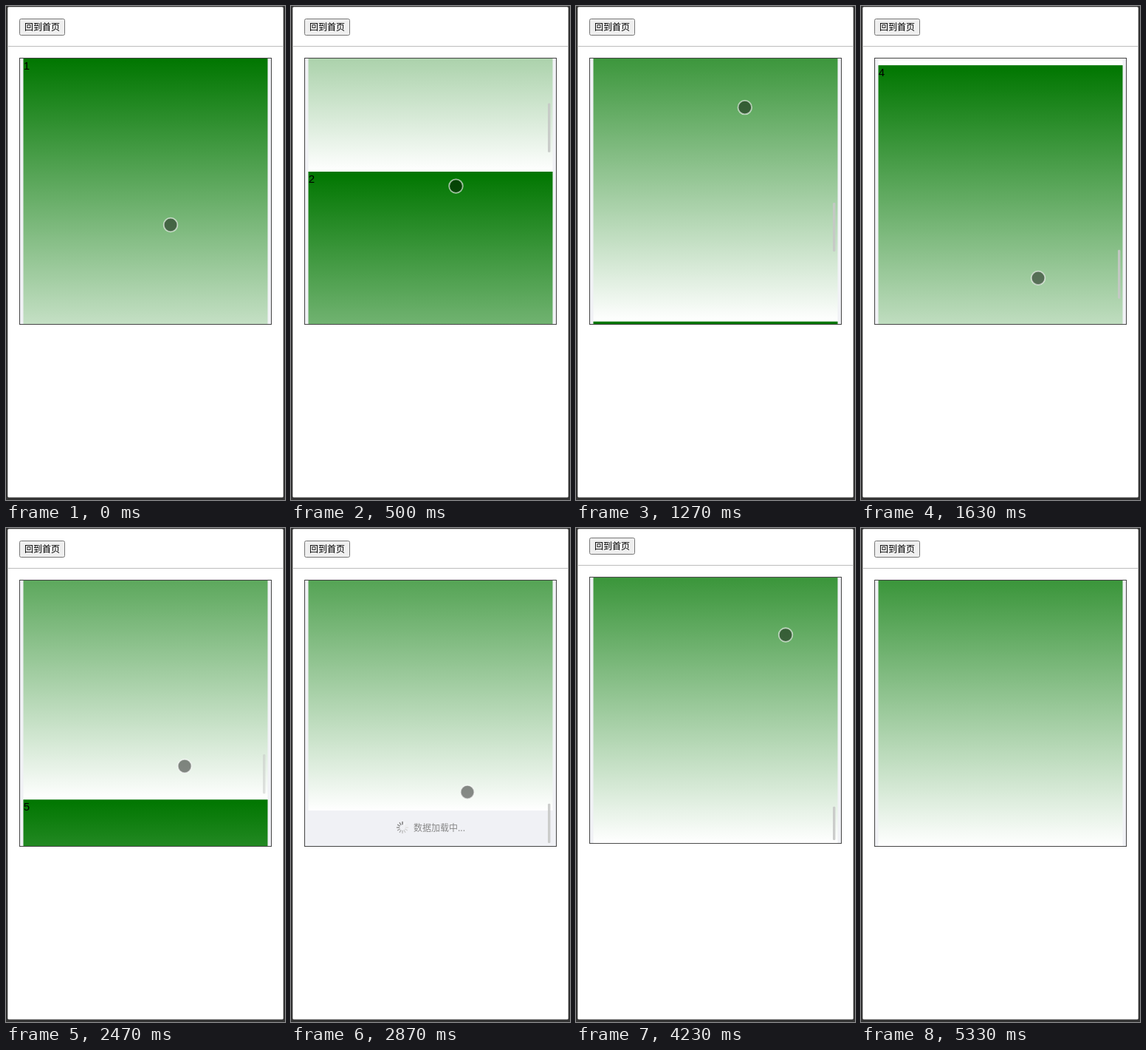
These frames come from a looping animation (378x668 px, 5.91 s). An HTML page:

```html
<!DOCTYPE html>
<html lang="zh">
<head>
<meta charset="utf-8">
<title>上拉加载</title>
<style>
html, body { margin: 0; width: 100%; height: 100%; overflow: hidden; background: #333; }
svg { display: block; width: 378px; height: 668px; }
text { font-family: "Noto Sans CJK SC", "Noto Sans", sans-serif; font-size: 12px; }
.num { font-family: "Liberation Sans", Arial, sans-serif; font-size: 15px; }
</style>
</head>
<body>
<svg viewBox="0 0 378 668">
  <defs>
    <linearGradient id="green" x2="0" y2="1">
      <stop offset="0" stop-color="#007600"/>
      <stop offset="1" stop-color="#fff"/>
    </linearGradient>
    <clipPath id="screen"><rect x="2.3" y="1.2" width="373.4" height="663.4" rx="1.5"/></clipPath>
    <clipPath id="view"><rect x="19" y="71" width="340" height="359"/></clipPath>
  </defs>
  <rect width="378" height="668" fill="#333"/>
  <g clip-path="url(#screen)">
    <rect width="378" height="668" fill="#fff"/>
    <g id="page">
      <rect x="18.5" y="17.5" width="61" height="22" rx="2" fill="#efefef" stroke="#767676"/>
      <text x="25" y="33">回到首页</text>
      <path d="M2 54.5H376" stroke="#bcbcbc"/>
      <rect x="18.5" y="70.5" width="341" height="360" fill="#f0f1f5" stroke="#444"/>
      <g clip-path="url(#view)">
        <g id="list">
          <g id="loader">
            <g id="spin"></g>
            <text x="166" y="27.5" fill="#888">数据加载中...</text>
          </g>
        </g>
        <rect id="thumb" x="348" width="3.4" rx="1.2" fill="#c6c8c6"/>
      </g>
    </g>
    <g id="touch">
      <circle r="9.3" fill="#000" fill-opacity=".45"/>
      <circle r="9.3" fill="none" stroke="#fff" stroke-opacity=".6" stroke-width="1.8"/>
    </g>
  </g>
</svg>
<script>
const LOOP = 5910, ITEM = 466, VIEW = 359, TOP = 71, LOADER = 48;
const TRACK = 352, TRACK_TOP = 74;
const $ = id => document.getElementById(id);

function add(parent, tag, attrs, text) {
  const el = document.createElementNS('http://www.w3.org/2000/svg', tag);
  for (const k in attrs) el.setAttribute(k, attrs[k]);
  if (text) el.textContent = text;
  parent.appendChild(el);
  return el;
}

// Keys are [time, value]; slopes are limited so the curve never overshoots.
function curve(keys) {
  const n = keys.length - 1;
  const rate = i => (keys[i + 1][1] - keys[i][1]) / (keys[i + 1][0] - keys[i][0]);
  const slope = keys.map((k, i) => {
    if (i === 0 || i === n) return 0;
    const a = rate(i - 1), b = rate(i);
    return a * b <= 0 ? 0 : 2 * a * b / (a + b);
  });
  return t => {
    if (t >= keys[n][0]) return keys[n][1];
    let i = 0;
    while (t >= keys[i + 1][0]) i++;
    const [t0, v0] = keys[i], [t1, v1] = keys[i + 1];
    const h = t1 - t0, u = (t - t0) / h, w = 1 - u;
    return v0 * (1 + 2 * u) * w * w + v1 * u * u * (3 - 2 * u)
      + h * u * w * (slope[i] * w - slope[i + 1] * u);
  };
}

const scroll = curve([[0, 0], [300, 146], [720, 508], [1070, 727], [1200, 930],
  [1400, 1220], [1630, 1388], [1790, 1553], [2440, 1553], [2600, 1780],
  [2740, 2019], [3600, 2019], [3770, 2161], [3980, 2437]]);

const shift = curve([[0, 0], [2600, 0], [2700, -7], [2840, 0], [3000, 0], [3130, -7],
  [3300, 0], [3920, 0], [4000, -7], [4110, 0], [4160, 0], [4230, -4], [4330, -7],
  [4520, 0], [4730, 0], [4850, -10], [5060, 0]]);

const touchX = curve([[0, 223], [1070, 225], [1630, 240], [2000, 246], [2870, 239],
  [3770, 271], [4230, 284], [4830, 292], [5000, 312], [5200, 400]]);

const touchY = curve([[0, 296], [300, 150], [720, 350], [1070, 131], [1200, 116],
  [1600, 370], [1630, 368], [1880, 116], [2400, 372], [2640, 135], [2870, 357],
  [2920, 362], [3150, 140], [3580, 320], [3770, 165], [3860, 130], [4090, 335],
  [4230, 145], [4330, 118], [4650, 360], [4830, 150], [5010, 441], [5200, 432]]);

const barAlpha = curve([[0, 0], [60, 0], [160, 0.9], [2150, 0.9], [2390, 0],
  [2435, 0], [2500, 0.9], [4700, 0.9], [4950, 0]]);

const items = [];
for (let i = 0; i < 6; i++) {
  const g = add($('list'), 'g', { transform: `translate(0 ${i * ITEM})` });
  add(g, 'rect', { x: 23.5, width: 331, height: ITEM, fill: 'url(#green)' });
  add(g, 'text', { x: 23.7, y: 15, class: 'num' }, String(i + 1));
  items.push(g);
}

for (let i = 0; i < 12; i++) {
  const c = 250 - 13 * i;
  add($('spin'), 'path', {
    d: 'M0 -4.3V-7.5', stroke: `rgb(${c},${c},${c})`, 'stroke-width': 1.3,
    'stroke-linecap': 'round', transform: `rotate(${i * 30 + 30})`
  });
}

function draw(t) {
  const count = t < 2440 ? 4 : t < 3450 ? 5 : 6;
  const more = count < 6;
  const full = count * ITEM + (more ? LOADER : 0);
  const y = scroll(t), len = TRACK * VIEW / full;

  items.forEach((g, i) => g.setAttribute('display', i < count ? 'inline' : 'none'));
  $('list').setAttribute('transform', `translate(0 ${TOP - y})`);
  $('loader').setAttribute('display', more ? 'inline' : 'none');
  $('loader').setAttribute('transform', `translate(0 ${count * ITEM})`);
  const turn = Math.floor((t - 2870 + 6000) / 1000 * 12) * 30;
  $('spin').setAttribute('transform', `translate(151 23) rotate(${turn % 360})`);

  const thumb = $('thumb');
  thumb.setAttribute('y', TRACK_TOP + (TRACK - len) * y / (full - VIEW));
  thumb.setAttribute('height', len);
  thumb.setAttribute('opacity', barAlpha(t));

  $('page').setAttribute('transform', `translate(0 ${shift(t)})`);
  $('touch').setAttribute('transform', `translate(${touchX(t)} ${touchY(t)})`);
  $('touch').setAttribute('display', t < 5200 ? 'inline' : 'none');
}

const start = performance.now();
function frame() {
  draw((performance.now() - start) % LOOP);
  requestAnimationFrame(frame);
}
draw(0);
requestAnimationFrame(frame);
</script>
</body>
</html>
```
